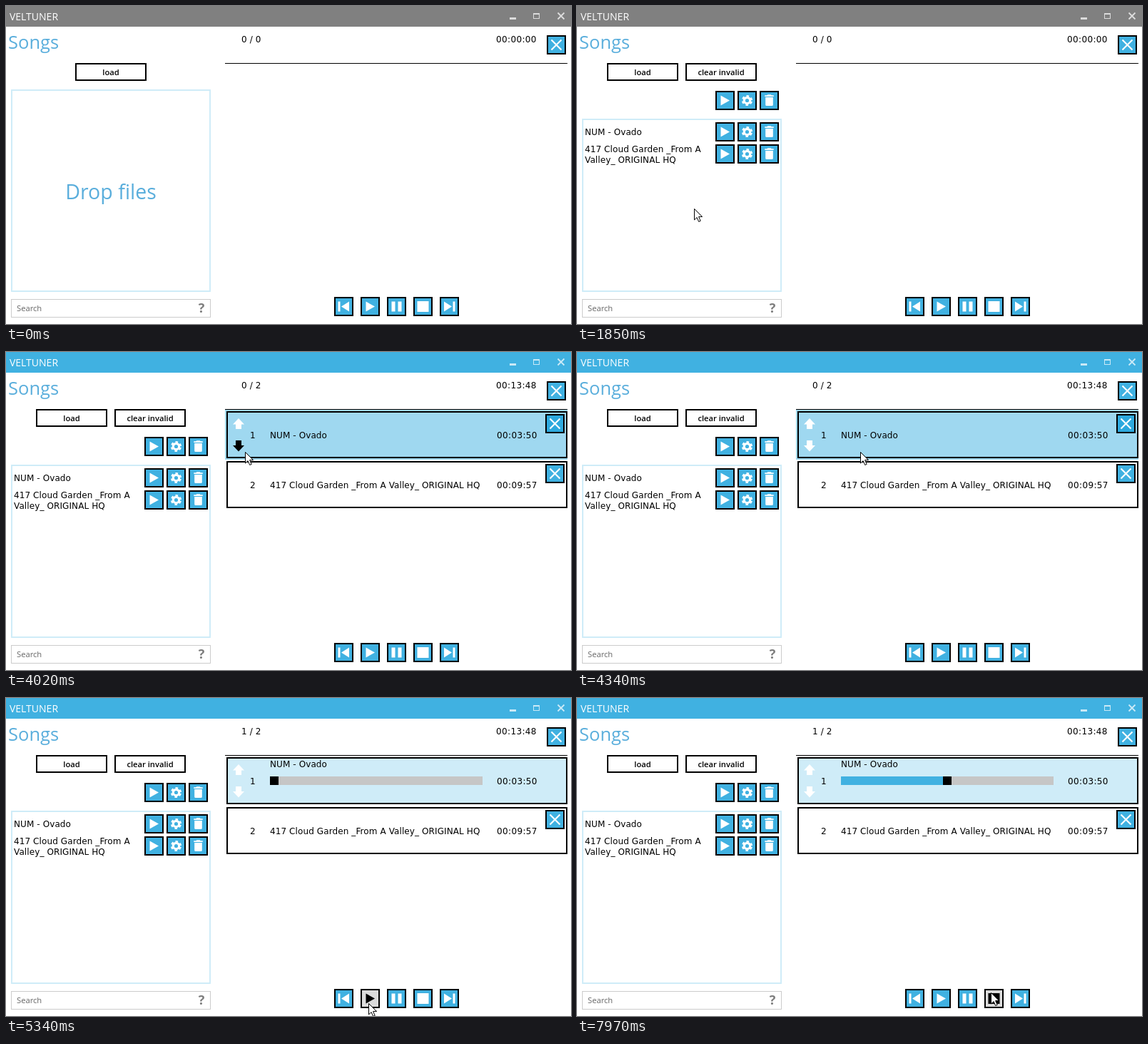
An HTML page that plays this animation: 792 px wide and 446 px high, repeating every 8000 ms.

```html
<!DOCTYPE html>
<html lang="en">
<head>
<meta charset="utf-8">
<title>Music player</title>
<style>
  :root {
    --accent: rgba(17, 158, 218, .8);
    --hover: rgba(17, 158, 218, .4);
    --tint: rgba(17, 158, 218, .2);
  }
  html, body { margin: 0; width: 100%; height: 100%; overflow: hidden; background: #fff; }
  svg { display: block; }
  rect, .crisp { shape-rendering: crispEdges; }
  text { white-space: pre; }
  .ui { font-family: "Open Sans", "Noto Sans", sans-serif; }
  .title { font-size: 14px; fill: #fff; }
  .row { font: 12px "DejaVu Sans", sans-serif; letter-spacing: .1px; }
  .time { letter-spacing: .36px; }
  .head { fill: #5aaedc; }
  .label { font-size: 11.2px; font-weight: 600; text-anchor: middle; }
  .frame { fill: none; stroke: #000; stroke-width: 2; }
  .live { fill: var(--tint); }
  .hover { fill: var(--hover); }
  .drop { fill: none; stroke: var(--tint); stroke-width: 2; }
  .btn { color: #fff; }
  .btn rect { fill: var(--accent); stroke: #000; stroke-width: 2; }
  .btn.hot { color: #000; }
  .btn.hot rect { fill: #dcdcdc; }
  .btn path { fill: currentColor; }
  .btn .line { fill: none; stroke: currentColor; }
  .arrow { fill: #fff; }
  .arrow.hot { fill: #000; }
</style>
</head>
<body>
<svg id="stage" width="792" height="446" viewBox="0 0 792 446"></svg>
<script>
const LOOP = 8000, STEP = 77;
const ENTER = 1160, DROP = 1850, QUEUE = 3710, PLAY = 5340, TICK = 6350, GRAB = 7035, RELEASE = 7510;
const SONG_A = "NUM - Ovado";
const SONG_B = ["417 Cloud Garden _From A", "Valley_ ORIGINAL HQ"];

const icons = {
  play: '<path d="M7.5 6.5L20 13.5 7.5 20.5z"/>',
  prev: '<path d="M5.5 6.5h3v14h-3zM21 6.5v14l-11-7z"/>',
  next: '<path d="M6 6.5v14l11-7zM18.5 6.5h3v14h-3z"/>',
  pause: '<path d="M6.5 6.5h5v14h-5zM15.5 6.5h5v14h-5z"/>',
  stop: '<path d="M5.5 6h16v15h-16z"/>',
  close: '<path class="line" stroke-width="2.1" d="M6.5 6.5l14 14m0-14l-14 14"/>',
  gear: '<circle class="line" cx="13.5" cy="13.5" r="4.2" stroke-width="3.2"/>' +
    '<circle class="line" cx="13.5" cy="13.5" r="6.3" stroke-width="2.6" ' +
    'stroke-dasharray="3.5 3.1" stroke-dashoffset="5.05"/>',
  trash: '<path d="M7.3 6.2h3l1-1h4.4l1 1h3V8H7.3zM8.2 8.9h10.6v10.6q0 1.6-1.6 1.6H9.8q-1.6 0-1.6-1.6z"/>'
};

const button = (icon, x, y) =>
  `<g class="btn" data-x="${x}" data-y="${y}" transform="translate(${x} ${y})">
    <rect x="1" y="1" width="25" height="25"/>${icons[icon]}</g>`;
const tools = y => ["play", "gear", "trash"].map((n, i) => button(n, 194 + 31 * i, y)).join("");
const textButton = (label, x) =>
  `<rect class="frame" x="${x + 1}" y="81" width="98" height="23"/>
   <text class="ui label" x="${x + 50}" y="97">${label}</text>`;
const text = (s, x, y, cls = "row", id = "") => `<text class="${cls}" id="${id}" x="${x}" y="${y}">${s}</text>`;
const listFrame = y => `<rect class="drop" x="8" y="${y + 1}" width="278" height="${399 - y}"/>`;
const listItem = n => `<rect id="item${n}" class="hover" x="9" y="${130 + 31 * n}" width="276" height="31"/>`;

const queueRow = (n, y, name, time) =>
  `<rect id="glow${n}" class="hover" x="307" y="${y - 2}" width="480" height="70"/>
   <rect id="card${n}" class="frame" x="310" y="${y + 1}" width="476" height="64"/>
   <path class="arrow" d="M326 ${y + 10}l8 8.5h-4v6.5h-8v-6.5h-4z"/>
   <path class="arrow" id="down${n}" d="M326 ${y + 56.5}l8-8.5h-4v-7h-8v7h-4z"/>` +
  text(n, 342, y + 38) + text(name, 370, y + 38, "row", "name" + n) + text(time, 688, y + 38, "row time") +
  `<g id="remove${n}">${button("close", 756, y + 4)}</g>`;

document.getElementById("stage").innerHTML = `
  <rect id="bar" width="792" height="29"/>
  ${text("VELTUNER", 5, 20, "ui title")}
  <g fill="none" stroke="#fff" opacity=".72">
    <path class="crisp" stroke-width="3" d="M706 17.5h9"/>
    <path class="crisp" d="M739.5 10.5h8v7h-8zM739 11.5h9"/>
    <path stroke-width="1.8" d="M773.5 9.5l9 9m0-9l-9 9"/>
  </g>
  <text class="ui head" font-size="25.5" x="3" y="60">Songs</text>
  <g id="empty">
    ${textButton("load", 97)}${listFrame(117)}
    <text class="ui head" font-size="28.5" text-anchor="middle" x="147" y="271">Drop files</text>
  </g>
  <g id="list">
    ${textButton("load", 42)}${textButton("clear invalid", 152)}
    ${listItem(1)}${listItem(2)}${listFrame(158)}
    ${text(SONG_A, 11, 181)}${text(SONG_B[0], 11, 205)}${text(SONG_B[1], 11, 220)}
    ${tools(119)}${tools(163)}${tools(194)}
  </g>
  <rect x="7.5" y="411.5" width="279" height="25" fill="#fff" stroke="#ccc"/>
  <text class="ui" font-size="11.2" fill="#666" x="15" y="428">Search</text>
  <text class="ui" font-size="18" font-weight="700" fill="#7c7c7c" text-anchor="middle" x="274" y="430">?</text>
  ${text("0 / 0", 330, 51, "row", "count")}${text("00:00:00", 687, 51, "row time", "total")}
  ${button("close", 758, 41)}
  <g id="queue">
    ${queueRow(1, 83, SONG_A, "00:03:50")}
    ${queueRow(2, 153, SONG_B.join(" "), "00:09:57")}
    <g id="slider">
      <rect x="370" y="110" width="298" height="12" fill="#c6c6c6"/>
      <rect id="fill" x="370" y="110" height="12" fill="#41b1e1"/>
      <rect id="thumb" y="110" width="12" height="12"/>
    </g>
  </g>
  <rect x="307" y="80" width="480" height="1"/>
  ${["prev", "play", "pause", "stop", "next"].map((n, i) => button(n, 460 + 37 * i, 408)).join("")}
  <g id="cursor">
    <path d="M.5 .5v15.5l3.6-3.4 2.6 5.9 2.5-1.1-2.6-5.8h5z" fill="#fff" stroke="#000"/>
    <g id="badge">
      <rect x="11.5" y="20.5" width="10" height="10" fill="#fff" stroke="#000"/>
      <path class="crisp" d="M16.5 23v6m-3-3h6" stroke="#000"/>
    </g>
  </g>`;

const $ = id => document.getElementById(id);
const show = (id, on) => { $(id).style.display = on ? "" : "none"; };
const buttons = [...document.querySelectorAll(".btn")];

// Each move starts where the one before it ended.
const home = { x: 782, y: 287 };
const moves = [
  { from: ENTER, to: 1700, x: 164, y: 284 },   // drag files in
  { from: 2630, to: 2780, x: 161, y: 284 },
  { from: 2950, to: 3560, x: 208, y: 130 },    // play all
  { from: QUEUE, to: 4020, x: 335, y: 140 },   // reorder arrow
  { from: 4120, to: 4650, x: 477, y: 140 },
  { from: 4720, to: PLAY, x: 508, y: 428 },    // play
  { from: 5490, to: 5720, x: 526, y: 324 },
  { from: 6650, to: 6730, x: 518, y: 126 },
  { from: 6800, to: GRAB, x: 377, y: 117 },    // slider thumb
  { from: GRAB, to: 7420, x: 519, y: 117 },
  { from: RELEASE, to: 7970, x: 580, y: 413 }  // stop
];

// The pointer jumps once per STEP while it moves.
function pointer(t) {
  let { x, y } = home;
  for (const m of moves) {
    if (t < m.from) break;
    const ticks = Math.floor((t - m.from) / STEP) + 1;
    const k = Math.min(1, ticks * STEP / (m.to - m.from));
    x += (m.x - x) * k;
    y += (m.y - y) * k;
  }
  return [Math.round(x), Math.round(y)];
}

function draw(t) {
  const [x, y] = pointer(t);
  const loaded = t >= DROP, queued = t >= QUEUE, playing = t >= PLAY;
  const over = (left, top, w, h) => loaded && x >= left && x < left + w && y >= top && y < top + h;

  $("bar").style.fill = queued ? "var(--accent)" : "#808080";
  $("count").textContent = playing ? "1 / 2" : queued ? "0 / 2" : "0 / 0";
  $("total").textContent = queued ? "00:13:48" : "00:00:00";
  show("empty", !loaded);
  show("list", loaded);
  show("queue", queued);
  show("slider", playing);
  show("remove1", !playing);
  show("cursor", t >= ENTER);
  show("badge", !loaded);
  $("cursor").setAttribute("transform", `translate(${x} ${y})`);

  for (const n of [1, 2]) {
    const top = 13 + 70 * n;
    show("item" + n, over(9, 130 + 31 * n, 276, 31));
    show("glow" + n, over(307, top - 2, 480, 70));
    $("down" + n).classList.toggle("hot", over(317, top + 39, 20, 19));
  }
  for (const b of buttons) b.classList.toggle("hot", over(+b.dataset.x, +b.dataset.y, 27, 27));

  $("card1").classList.toggle("live", playing);
  $("name1").setAttribute("y", playing ? 97 : 121);
  const idle = t >= TICK ? 371 : 370;
  const thumb = t < GRAB ? idle : t < RELEASE ? Math.max(idle, x - 6) : 513;
  $("thumb").setAttribute("x", thumb);
  $("fill").setAttribute("width", thumb - 370);
}

const begin = performance.now();
function tick() {
  draw((performance.now() - begin) % LOOP);
  requestAnimationFrame(tick);
}
tick();
</script>
</body>
</html>
```
